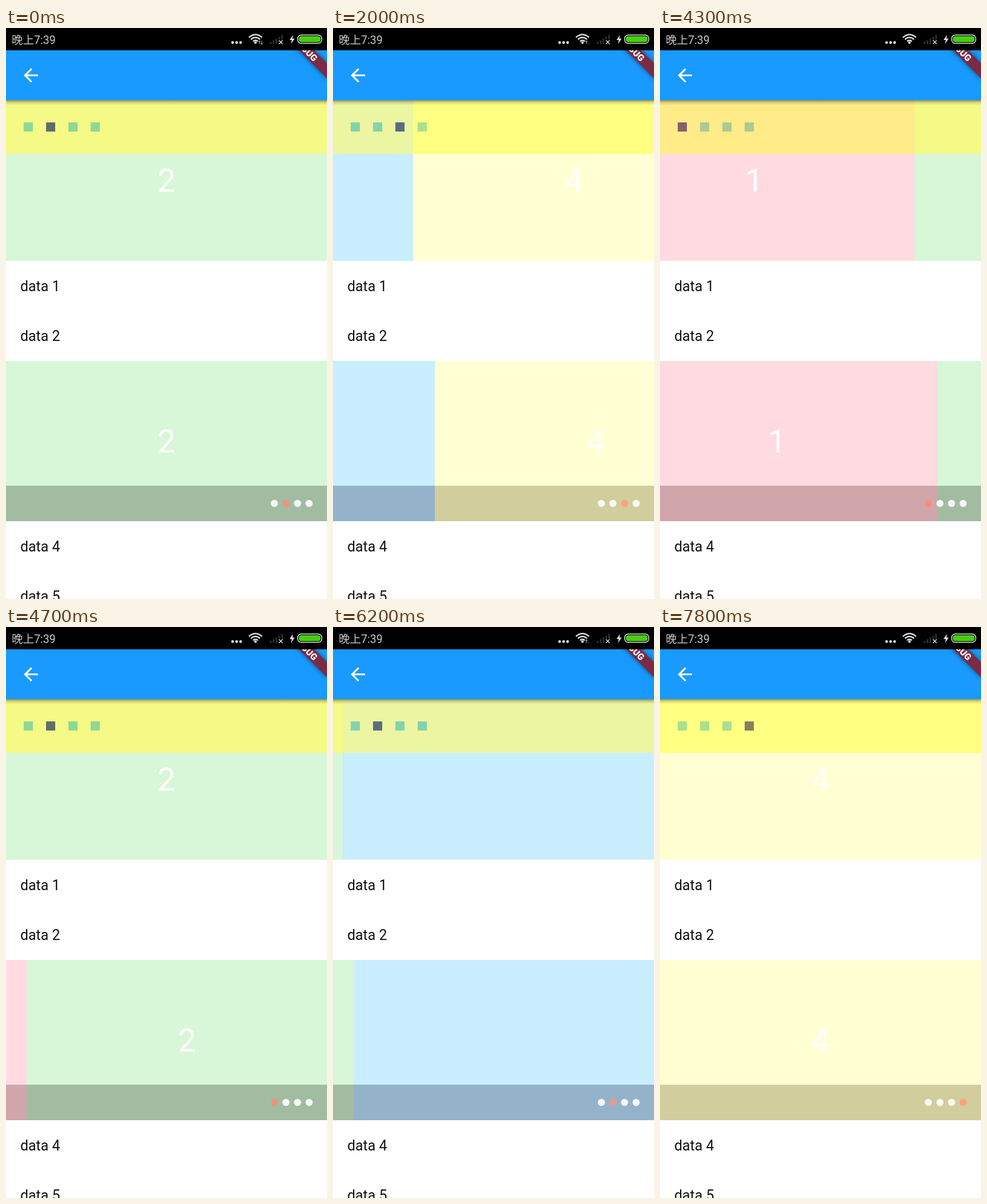
Write an HTML page that moves like this. It is 561 px wide and 998 px high and loops after 8000 ms.

```html
<!DOCTYPE html>
<html lang="zh">
<head>
<meta charset="utf-8">
<title>Carousels</title>
<style>
  html, body { margin: 0; width: 100%; height: 100%; overflow: hidden; background: #fff; }
  #stage { display: block; width: 100%; height: 100%; font-family: Roboto, "Noto Sans CJK SC", "Noto Sans CJK", sans-serif; }
  .digit { font-size: 56.1px; fill: #fff; text-anchor: middle; }
  .row { font-size: 24.93px; fill: #111; }
</style>
</head>
<body>
<svg id="stage" viewBox="0 0 561 998" preserveAspectRatio="none">
  <defs>
    <linearGradient id="shade" x2="0" y2="1">
      <stop offset="0" stop-opacity=".42"/>
      <stop offset=".45" stop-opacity=".14"/>
      <stop offset="1" stop-opacity="0"/>
    </linearGradient>
    <filter id="soft" x="-20%" y="-100%" width="140%" height="300%"><feGaussianBlur stdDeviation="4"/></filter>
  </defs>
  <rect width="561" height="998" fill="#fff"/>
  <g id="rows"></g>
  <g id="carousels"></g>

  <rect y="126" width="561" height="9" fill="url(#shade)"/>
  <rect y="39" width="561" height="87" fill="#199aff"/>
  <path transform="translate(24.9 64) scale(1.558)" fill="#fff"
    d="M20 11H7.83l5.59-5.59L12 4l-8 8 8 8 1.41-1.41L7.83 13H20v-2z"/>
  <g transform="translate(561 0) rotate(45)">
    <rect x="-62.3" y="43.6" width="124.6" height="18.7" opacity=".5" filter="url(#soft)"/>
    <rect x="-62.3" y="43.6" width="124.6" height="18.7" fill="#7b2b43"/>
    <text y="58.6" font-size="15.9" font-weight="900" fill="#fff" text-anchor="middle">DEBUG</text>
  </g>

  <rect width="561" height="39" fill="#000"/>
  <text x="10" y="27.5" font-size="19.5" fill="#c8c8c8">晚上7:39</text>
  <g fill="#ddd">
    <circle cx="396" cy="25.5" r="2.4"/><circle cx="403" cy="25.5" r="2.4"/><circle cx="410" cy="25.5" r="2.4"/>
    <circle cx="436" cy="25.5" r="2.3"/>
  </g>
  <g fill="none" stroke="#ddd" stroke-width="2.4">
    <path d="M424.5 16.5Q436 6.5 447.5 16.5M428 20Q436 13 444 20M431.7 23.4Q436 19.6 440.3 23.4"/>
  </g>
  <g id="traffic">
    <rect x="441" y="22" width="8" height="7"/>
    <path d="M443 22.5V28M441.6 24L443 22.3L444.4 24" stroke="#ddd" fill="none"/>
    <path id="down" d="M447 22.5V28M445.6 26.8L447 28.5L448.4 26.8" stroke="#ddd" fill="none"/>
  </g>
  <path d="M462.5 28V24M467.5 28V21.5M472.5 28V18.5M477.5 20V15.5M482.5 20V12" stroke="#2c2c2c" stroke-width="3"/>
  <path d="M477 21.5l6.5 6.5m0-6.5l-6.5 6.5" stroke="#ddd" stroke-width="1.5"/>
  <path d="M501.5 12l-6 9h4l-1.5 7 6.500-9.500h-4z" fill="#e4e4e4"/>
  <rect x="509.800" y="12.300" width="42" height="14.400" rx="6" fill="#000" stroke="#e4e4e4" stroke-width="1.500"/>
  <rect x="511.800" y="14.300" width="38" height="10.400" rx="4.300" fill="#45cf10"/>
</svg>
<script>
const W = 561, LOOP = 8000, STEP = 100, SLIDE = 500;
const $ = id => document.getElementById(id);

const pages = [
  { bg: '#ffdbe1', top: '#ffeb87', square: '#adc994', squareOn: '#85606c', bottom: '#d0a6aa', dotOn: '#fb8c82' },
  { bg: '#d7f7d8', top: '#f5f985', square: '#8ed896', squareOn: '#616d69', bottom: '#a2bca2', dotOn: '#f0947f' },
  { bg: '#c8eeff', top: '#ecf5a2', square: '#83d3ae', squareOn: '#5a6c80', bottom: '#94b3cb', dotOn: '#ea9793' },
  { bg: '#ffffd3', top: '#ffff82', square: '#a9df8e', squareOn: '#84805f', bottom: '#d1cd9c', dotOn: '#ffa181' }
];

// Moves are [start time, target page]; a backward move is a jump.
const carousels = [
  {
    y: 126, height: 281, bar: [0, 94], barColor: 'top', off: p => p.square, on: p => p.squareOn,
    mark: i => `<rect x="${31 + 39 * i}" y="39" width="16" height="16"/>`,
    moves: [[115, 2], [1625, 3], [3200, 0], [4197, 1], [5715, 2], [7300, 3]]
  },
  {
    y: 582, height: 280, bar: [218, 62], barColor: 'bottom', off: () => 'rgba(255,255,255,.9)', on: p => p.dotOn,
    mark: i => `<circle cx="${469 + 20.25 * i}" cy="249" r="6.2"/>`,
    moves: [[150, 2], [1659, 3], [3200, 0], [4232, 1], [5732, 2], [7300, 3]]
  }
];

const pageMarkup = (c, p, i) => `<svg width="${W}" height="${c.height}">
  <rect width="${W}" height="${c.height}" fill="${p.bg}"/>
  <text class="digit" x="280.5" y="159.5">${i === 2 ? '' : i + 1}</text>
  <rect y="${c.bar[0]}" width="${W}" height="${c.bar[1]}" fill="${p[c.barColor]}"/>
  <g>${pages.map((_, k) => c.mark(k)).join('')}</g></svg>`;

$('rows').innerHTML = [[1, 459.5], [2, 546.7], [4, 915], [5, 1002]]
  .map(([n, y]) => `<text class="row" x="25" y="${y}">data ${n}</text>`).join('');

$('carousels').innerHTML = carousels.map(c =>
  `<svg y="${c.y}" width="${W}" height="${c.height}">${pages.map((p, i) => pageMarkup(c, p, i)).join('')}</svg>`).join('');

carousels.forEach((c, n) => {
  c.views = [...$('carousels').children[n].children].map(el => ({ el, marks: el.querySelector('g') }));
});

function stateAt(moves, t) {
  let page = 1;
  for (const [start, target] of moves) {
    if (t < start) break;
    const progress = (t - start) / SLIDE;
    if (target > page && progress < 1) return { active: page, position: page + progress };
    page = target;
  }
  return { active: page, position: page };
}

function draw(t) {
  for (const c of carousels) {
    const { active, position } = stateAt(c.moves, t);
    c.views.forEach(({ el, marks }, i) => {
      const x = Math.round((i - position) * W);
      el.setAttribute('x', x);
      el.style.display = Math.abs(x) < W ? '' : 'none';
      // Indicators stay put while their page slides beneath them.
      marks.setAttribute('transform', `translate(${-x} 0)`);
      [...marks.children].forEach((m, k) => m.setAttribute('fill', (k === active ? c.on : c.off)(pages[i])));
    });
  }
  const busy = t < 3300 || (t >= 5200 && t < 7200);
  $('traffic').style.display = busy ? '' : 'none';
  $('down').setAttribute('opacity', t < 200 ? 1 : .25);
}

const origin = performance.now();
function tick() {
  const t = (performance.now() - origin) % LOOP;
  draw(Math.floor(t / STEP) * STEP);
  requestAnimationFrame(tick);
}
tick();
</script>
</body>
</html>
```
